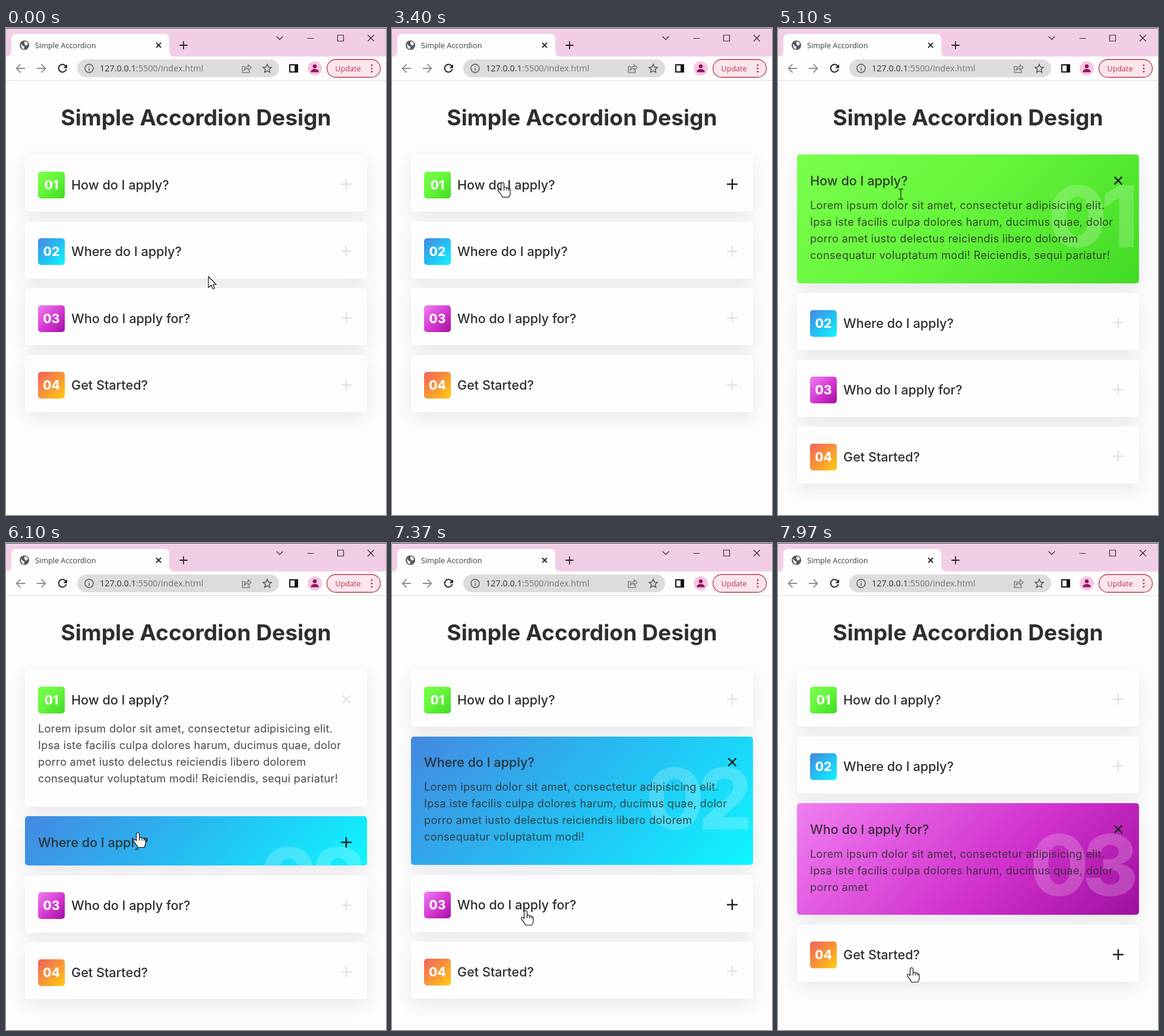
Animation, 640 px wide and 820 px high, one loop 8 s. Source, as an HTML page:

```html
<!DOCTYPE html>
<html lang="en">
<head>
<meta charset="utf-8">
<title>Simple Accordion</title>
<style>
  html, body { margin: 0; width: 100%; height: 100%; overflow: hidden; background: #fdfdfd; }
  #stage { position: absolute; inset: 0; overflow: hidden; font-family: Inter, "Open Sans", sans-serif; color: #2e2e2e; }
  #stage > svg { position: absolute; left: 0; top: 0; overflow: visible; }
  h1 { position: absolute; top: 126px; left: 0; width: 640px; margin: 0; font: 700 37.2px/50px Inter, sans-serif; text-align: center; white-space: nowrap; }
  .card { position: absolute; left: 32px; width: 576px; border-radius: 5px; overflow: hidden; background: #fdfdfd; }
  .shadow { position: absolute; left: 32px; width: 576px; border-radius: 5px; box-shadow: 0 10px 30px rgba(50, 50, 100, .1); }
  .badge { position: absolute; left: 22px; top: 28.5px; width: 45px; height: 45px; border-radius: 5px; color: #fdfdfd; font: 800 21px/45px Inter, sans-serif; text-align: center; }
  .big { position: absolute; right: 11px; top: 29px; color: rgba(255, 255, 255, .2); font: 800 143px/150px Inter, sans-serif; letter-spacing: -10px; }
  .heading { position: absolute; left: 78px; top: 28.5px; font-size: 21.6px; font-weight: 500; line-height: 45px; white-space: nowrap; }
  .body { position: absolute; left: 22px; top: 74px; width: 540px; overflow: hidden; }
  .body p { margin: 10.5px 0 11.5px; font-size: 18.2px; line-height: 28.16px; letter-spacing: .3px; white-space: pre; color: #4a4a4a; }
  .icon { position: absolute; left: 531px; width: 20px; height: 20px; fill: none; stroke-width: 2.5; }
  .active .badge, .card:not(.active) .big { display: none; }
  .active .heading { left: 22px; line-height: 31px; color: rgba(40, 40, 40, .9); }
  .active .body { top: 60px; }
  .active .body p { color: rgba(45, 45, 45, .85); }
  svg text { font-family: "Open Sans", "Noto Sans", sans-serif; }
</style>
</head>
<body>
<div id="stage">
  <h1>Simple Accordion Design</h1>
  <div id="list"></div>
  <svg width="640" height="90" fill="none" stroke-linecap="round">
    <path fill="#f2cee6" d="M0 0H640V48H0Z"/>
    <path fill="#5c5458" d="M0 0H640V1H0Z"/>
    <path fill="#fdfdfd" d="M0 48Q9 48 9 39V19Q9 10 18 10H266Q275 10 275 19V39Q275 48 284 48H640V88H0Z"/>
    <path stroke="#dcdcdc" d="M0 88.5H640"/>
    <!-- tab -->
    <circle cx="31" cy="29" r="8" fill="#55585c"/>
    <path fill="#fdfdfd" d="M25 26Q28 31 31 31Q30 34 31 36Q25 35 25 26ZM31 23Q35 22 37 27L34 30 31 27Z"/>
    <text x="49" y="33.5" font-size="12.7" fill="#3c3c3e">Simple Accordion</text>
    <path stroke="#262626" stroke-width="1.8" d="M253.5 25.5L260.5 32.5M260.5 25.5L253.5 32.5M293 29H305M299 23V35"/>
    <path stroke="#2e2a2c" stroke-width="1.2" d="M456 14.5L461 19.5 466 14.5M508 17.5H518M558.5 12H568.5V22H558.5ZM609.5 12L619.5 22M619.5 12L609.5 22"/>
    <!-- navigation -->
    <path stroke="#909090" stroke-width="1.8" d="M31.5 68H17.5M24 61.5L17.5 68 24 74.5M52.5 68H66.5M60 61.5L66.5 68 60 74.5"/>
    <path stroke="#222" stroke-width="2" d="M100.5 64A6.5 6.5 0 1 0 101.3 70"/>
    <path fill="#222" d="M103 61V67.5H96.5Z"/>
    <rect x="120" y="53" width="340" height="30" rx="15" fill="#dcdcdc"/>
    <g stroke="#58585a" stroke-width="1.5">
      <circle cx="140" cy="68" r="7"/>
      <path d="M140 67.5V71.5M140 64.5V64.6"/>
      <path stroke="#808082" d="M402 65H398V75H410V72M401 71Q402 65 408 65V62L413 66.5 408 71V68Q404 68 401 71Z"/>
      <path d="M440 61L442 65.8 447 66.3 443.2 69.6 444.4 74.6 440 72 435.6 74.6 436.8 69.6 433 66.3 438 65.8Z"/>
    </g>
    <text x="158" y="73.2" font-size="14.4" fill="#343436">127.0.0.1<tspan fill="#757577">:5500/index.html</tspan></text>
    <path stroke="#141414" stroke-width="2" d="M478 62H491V74H478Z"/>
    <path fill="#141414" d="M486 61H492V75H486Z"/>
    <circle cx="520" cy="68" r="12" fill="#f4c6e0"/>
    <circle cx="520" cy="64.5" r="3.3" fill="#8d1460"/>
    <path fill="#8d1460" d="M513.5 74.5V72.5Q515 69 520 69Q525 69 526.5 72.5V74.5Z"/>
    <rect x="540.5" y="53" width="90" height="30" rx="15" fill="#fae6ec" stroke="#c0364a" stroke-width="1.3"/>
    <text x="554.5" y="72.5" font-size="12.6" fill="#c0304a">Update</text>
    <path stroke="#c0304a" stroke-width="3" d="M616 62.5V62.6M616 68V68.1M616 73.5V73.6"/>
  </svg>
  <svg width="640" height="820">
    <g id="cursor" stroke="#1a1a1a" stroke-width="1.2" stroke-linejoin="round" fill="#fdfdfd">
      <path id="arrow" d="M0 .5V19L4.5 15 7.3 21.3 10.3 20 7.5 14H13Z"/>
      <path id="hand" d="M-2.5 2.5Q0-1 2.5 2.5V9.5Q5 7.5 7 10Q9.5 9 10.5 11.5Q13 11 13 14V19Q13 22 10.5 25.5H0Q-1.5 22-6.5 16Q-8.5 13-6 12Q-4.5 11.7-2.5 14.5ZM2.5 9.5V14M7 10V14M10.5 11.5V14.5"/>
      <path id="beam" fill="none" d="M-4-8.5H-1L0-7.5 1-8.5H4M0-7.5V7.5M-4 8.5H-1L0 7.5 1 8.5H4"/>
    </g>
  </svg>
</div>
<script>
const LOOP = 8000, SLIDE = 550, SPIN = 650, MAX_BODY = 300;
const CARD_TOP = 213, GAP = 16.5, LINE = 28.16;
const lorem = [
  'Lorem ipsum dolor sit amet, consectetur adipisicing elit.',
  'Ipsa iste facilis culpa dolores harum, ducimus quae, dolor',
  'porro amet iusto delectus reiciendis libero dolorem'
];
const items = [
  { title: 'How do I apply?', colors: '#7aff4c, #66f63c 45%, #42da24', open: 4103, close: 6097,
    lines: [...lorem, 'consequatur voluptatum modi! Reiciendis, sequi pariatur!'] },
  { title: 'Where do I apply?', colors: '#4488e0, #22c4f4 56%, #10f6ff', open: 6097, close: 7410,
    lines: [...lorem, 'consequatur voluptatum modi!'] },
  { title: 'Who do I apply for?', colors: '#f07ef0, #d030cc 60%, #9e109e', open: 7410, close: Infinity,
    lines: [lorem[0], lorem[1], 'porro amet'] },
  { title: 'Get Started?', colors: '#f2605e, #f89438 50%, #ffcc10', open: Infinity, close: Infinity, lines: [] }
];
// time, x, y of the pointer's hot spot
const pointerPath = [
  [0, 341, 418], [300, 341, 418], [850, 300, 500], [1600, 80, 200], [1970, 70, 182], [2600, 75, 185],
  [3500, 190, 262], [4200, 205, 268], [5200, 207, 280], [5900, 222, 487], [6150, 222, 487],
  [6600, 228, 519], [7300, 225, 618], [7550, 225, 618], [7900, 225, 714], [8000, 225, 714]
];
const byId = id => document.getElementById(id);
const list = byId('list');

items.forEach((item, i) => {
  const number = '0' + (i + 1);
  item.gradient = `linear-gradient(135deg, ${item.colors})`;
  item.shadow = document.createElement('div');
  item.shadow.className = 'shadow';
  item.card = document.createElement('div');
  item.card.innerHTML = `
    <div class="big">${number}</div>
    <div class="badge" style="background:${item.gradient}">${number}</div>
    <div class="heading">${item.title}</div>
    <div class="body"><p>${item.lines.join('\n')}</p></div>
    <svg class="icon" viewBox="-10 -10 20 20"><path d="M-9 0H9M0-9V9"/></svg>`;
  item.body = item.card.querySelector('.body');
  item.icon = item.card.querySelector('.icon');
  list.append(item.shadow, item.card);
});

// The CSS "ease" curve, solved by bisection
function ease(x) {
  if (x <= 0) return 0;
  if (x >= 1) return 1;
  const bezier = (s, a, b) => 3 * (1 - s) ** 2 * s * a + 3 * (1 - s) * s * s * b + s ** 3;
  let low = 0, high = 1;
  for (let k = 0; k < 24; k++) {
    const mid = (low + high) / 2;
    if (bezier(mid, .25, .25) < x) low = mid; else high = mid;
  }
  return bezier(low, .1, 1);
}

function openness(item, t, duration) {
  return t < item.close ? ease((t - item.open) / duration) : 1 - ease((t - item.close) / duration);
}

function pointerAt(t) {
  const k = pointerPath.findIndex(point => point[0] > t);
  const [t0, x0, y0] = pointerPath[k - 1], [t1, x1, y1] = pointerPath[k];
  const p = (t - t0) / (t1 - t0), s = p * p * (3 - 2 * p);
  return [x0 + (x1 - x0) * s, y0 + (y1 - y0) * s];
}

function render(t) {
  const [x, y] = pointerAt(t);
  let top = CARD_TOP, shape = 'arrow';
  for (const item of items) {
    const active = t >= item.open && t < item.close;
    const head = active ? 60 : 74;
    const bodyHeight = Math.min(item.lines.length * LINE + 22, MAX_BODY * openness(item, t, SLIDE));
    const height = head + bodyHeight + 22;
    const inside = x > 54 && x < 586;
    const hover = inside && y > top + 26 && y < top + head;
    if (hover) shape = 'hand';
    else if (inside && y >= top + head && y < top + head + bodyHeight) shape = 'beam';

    item.card.className = active ? 'card active' : 'card';
    item.card.style.background = active ? item.gradient : '';
    for (const box of [item.card, item.shadow]) {
      box.style.top = top + 'px';
      box.style.height = height + 'px';
    }
    item.body.style.height = bodyHeight + 'px';
    item.icon.style.top = (active ? 33.5 : 40) + 'px';
    item.icon.style.stroke = active || hover ? '#222' : '#e2e2e2';
    item.icon.style.transform = `rotate(${45 * openness(item, t, SPIN)}deg)`;
    top += height + GAP;
  }
  byId('cursor').setAttribute('transform', `translate(${x} ${y})`);
  for (const id of ['arrow', 'hand', 'beam']) byId(id).style.display = id === shape ? '' : 'none';
}

const start = performance.now();
function frame() {
  render((performance.now() - start) % LOOP);
  requestAnimationFrame(frame);
}
frame();
</script>
</body>
</html>
```
